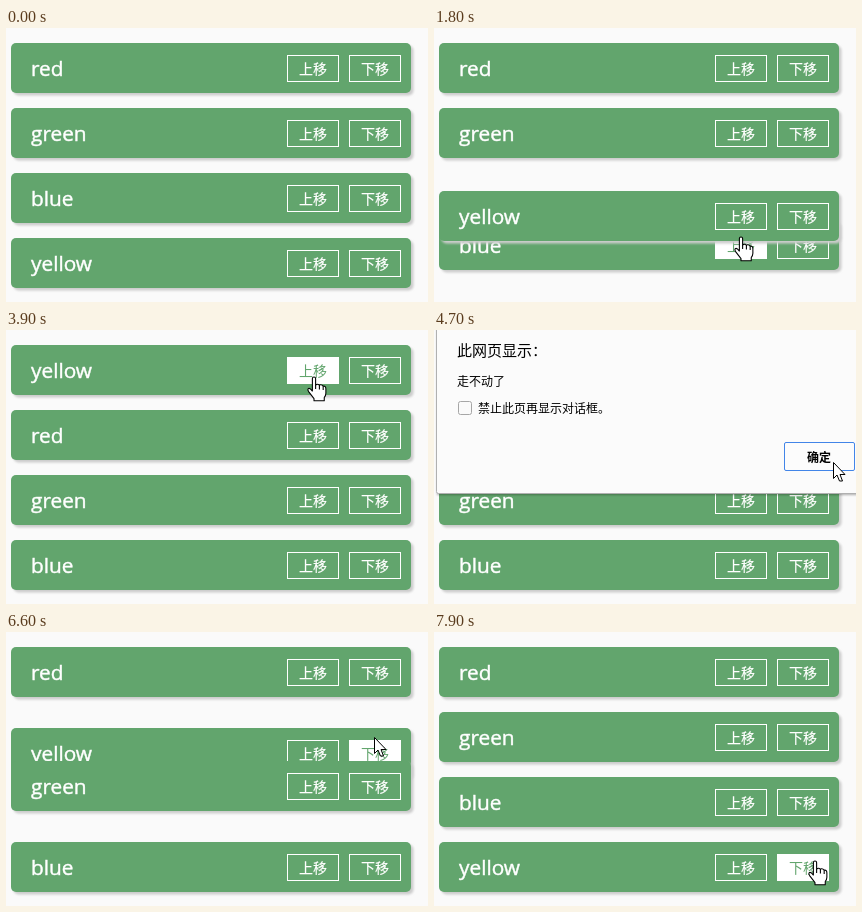
Animation of 422x274 px, one loop 8000 ms. Source, as an HTML page:

```html
<!DOCTYPE html>
<html lang="zh-CN">
<head>
<meta charset="utf-8">
<style>
html, body { margin: 0; width: 100%; height: 100%; overflow: hidden; background: #fafafa; }
svg { display: block; width: 422px; height: 274px; }
.label { font: 20.8px "Open Sans", "Noto Sans", sans-serif; fill: #fff; stroke: #fff; stroke-width: .45; }
.btn text { font: 14px "Noto Sans CJK SC", "Noto Sans CJK", sans-serif; fill: #fff; stroke: #fff; stroke-width: .2; text-anchor: middle; }
.btn rect { fill: none; stroke: #fff; }
.btn.on rect { fill: #fff; }
.btn.on text { fill: #62a56d; stroke: none; }
#dialog text { font: 12px "Noto Sans CJK SC", "Noto Sans CJK", sans-serif; fill: #000; }
#dialog .title { font: 15px "Noto Sans CJK TC", "Noto Sans CJK", sans-serif; }
#dialog .ok { font-weight: 700; text-anchor: middle; }
#cursor path { fill: #fff; stroke: #000; stroke-linejoin: round; }
</style>
</head>
<body>
<svg viewBox="0 0 422 274" xmlns="http://www.w3.org/2000/svg">
  <defs>
    <filter id="soft" x="-5%" y="-20%" width="110%" height="140%"><feGaussianBlur stdDeviation="1.2"/></filter>
  </defs>
  <rect width="422" height="274" fill="#fafafa"/>
  <g id="rows"></g>
  <g id="dialog">
    <rect x="3" y="-5" width="425" height="170" fill="#000" opacity=".3" filter="url(#soft)"/>
    <rect x="2.5" y="-5.5" width="430" height="169" rx="2" fill="#fbfbfb" stroke="#b0b0b0"/>
    <text class="title" x="23" y="26">此网页显示：</text>
    <text x="23" y="56">走不动了</text>
    <rect x="24.5" y="71.5" width="13" height="13" rx="2" fill="#fafafa" stroke="#a6a6a6"/>
    <text x="44" y="83">禁止此页再显示对话框。</text>
    <rect x="350.5" y="112.5" width="70" height="28" rx="1.5" fill="#fcfcfc" stroke="#4285e8"/>
    <text class="ok" x="385" y="131.5">确定</text>
  </g>
  <g id="cursor">
    <path id="arrow" d="M.5 .5V16.5L4 13L6.5 19H9.5L7 12.5H12Z"/>
    <g id="hand" transform="scale(1.08)">
      <path d="M-1.5 1.5Q-1.5 0 0 0T1.5 1.5V7.5Q3 6 5 7.5Q7 6.5 8.5 8.5Q11 8 11 11V15Q11 17 9.5 19V22H0V20L-5 13.5Q-6.5 11 -4.5 10.5Q-3.5 10.5 -1.5 13Z"/>
      <path d="M1.5 7.5V11M5 7.5V11.5M8.5 8.5V12"/>
    </g>
  </g>
</svg>
<script>
const LOOP = 8000, STEP = 100, SLIDE = 300, TOP = 15, PITCH = 65;
const ALERT = 4000, CLOSE = 5000, FADE = 300, SLACK = 4;
const BTN = { w: 52, h: 27, y: 12 };
const $ = id => document.getElementById(id);
const clamp = v => Math.min(1, Math.max(0, v));

// click times: three moves up, then three down
const clicks = [1606, 2204, 3030, 5730, 6502, 7330];

// pointer legs: leave, arrive, x, y
const legs = [
  [0, 300, 407, 38], [300, 700, 312, 102], [700, 1300, 307, 230],
  [1600, 2100, 306, 178], [2200, 2700, 301, 110], [3100, 3900, 308, 47],
  [4400, 4700, 399, 132], [5000, 5600, 370, 45], [5700, 6400, 368, 105],
  [6600, 7200, 375, 172], [7300, 7900, 381, 229]
];

const names = ["red", "green", "blue", "yellow"];
const kinds = [["up", 281, "上移"], ["down", 343, "下移"]];

const button = (row, [kind, x, text]) => `<g class="btn" id="${row}-${kind}">
  <rect x="${x + .5}" y="${BTN.y + .5}" width="${BTN.w - 1}" height="${BTN.h - 1}"/>
  <text x="${x + BTN.w / 2}" y="31">${text}</text></g>`;

$("rows").innerHTML = names.map(n => `<g id="${n}">
  <rect x="7.5" y="2.5" width="400" height="50" rx="5" fill="#ccc" filter="url(#soft)"/>
  <rect x="5" width="400" height="50" rx="5" fill="#62a56d"/>
  <text class="label" x="25" y="33">${n}</text>
  ${kinds.map(k => button(n, k)).join("")}</g>`).join("");

const swing = (t, start) => .5 - Math.cos(Math.PI * clamp((t - start) / SLIDE)) / 2;

function pointer(t) {
  let [, , x, y] = legs[0];
  for (const [leave, arrive, toX, toY] of legs) {
    const f = clamp((t - leave) / (arrive - leave));
    x += (toX - x) * f;
    y += (toY - y) * f;
  }
  return [Math.round(x), Math.round(y)];
}

function rowTops(t) {
  const p = clicks.map(c => swing(t, c));
  const slots = [
    p[2] - p[3],
    1 + p[1] - p[4],
    2 + p[0] - p[5],
    3 - p[0] - p[1] - p[2] + p[3] + p[4] + p[5]
  ];
  return slots.map(s => Math.round(TOP + PITCH * s));
}

let rising;
function draw(t) {
  const tops = rowTops(t), [x, y] = pointer(t);
  const open = t > ALERT && t < CLOSE + FADE;
  let hand = false;

  names.forEach((n, i) => {
    $(n).setAttribute("transform", `translate(0 ${tops[i]})`);
    for (const [kind, left] of kinds) {
      const dx = Math.abs(x - left - BTN.w / 2) - BTN.w / 2;
      const dy = Math.abs(y - tops[i] - BTN.y - BTN.h / 2) - BTN.h / 2;
      // highlight lingers slightly past the button's edge
      const on = t >= 300 && dx < 0 && dy < SLACK;
      $(`${n}-${kind}`).classList.toggle("on", on);
      hand = hand || (on && dy < 0 && !open);
    }
  });

  // the lower item of a swapped pair lies on top
  if (rising !== t < ALERT) {
    rising = t < ALERT;
    $("rows").insertBefore($("yellow"), rising ? null : $("rows").firstChild);
  }

  $("dialog").setAttribute("opacity", clamp((t - ALERT) / FADE) * clamp((CLOSE + FADE - t) / FADE));
  $("cursor").setAttribute("transform", `translate(${x} ${y})`);
  $("cursor").style.display = t < 300 ? "none" : "";
  $("hand").style.display = hand ? "" : "none";
  $("arrow").style.display = hand ? "none" : "";
}

const begin = performance.now();
function tick() {
  const t = (performance.now() - begin) % LOOP;
  draw(Math.floor(t / STEP) * STEP);
  requestAnimationFrame(tick);
}
tick();
</script>
</body>
</html>
```
